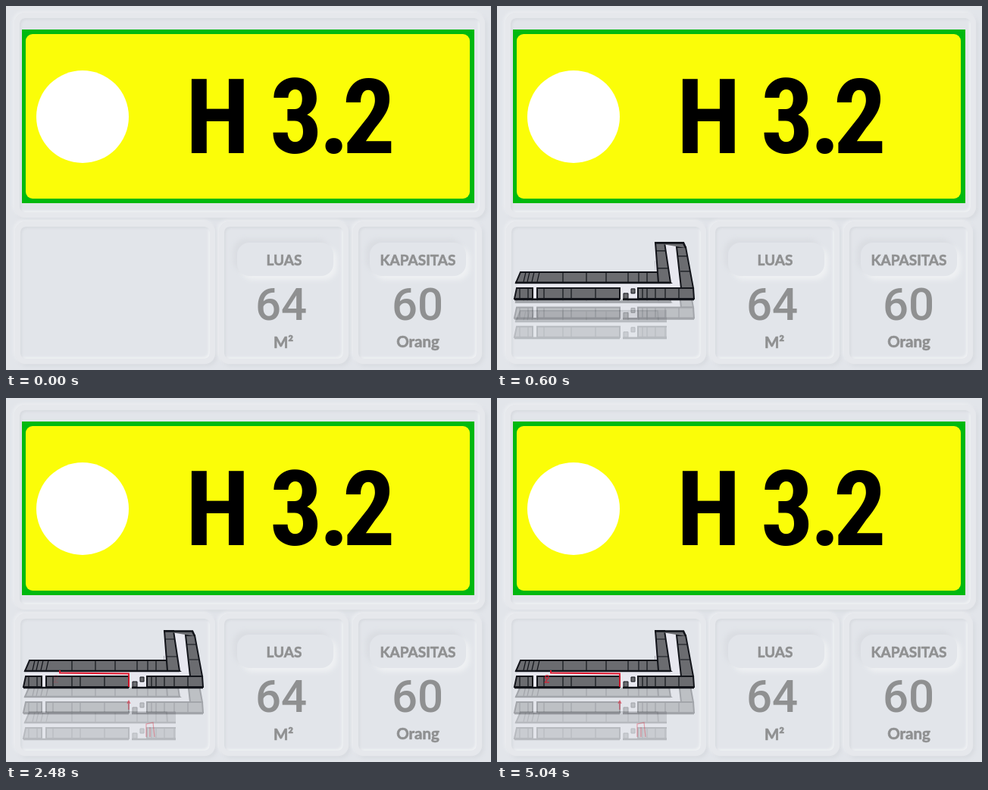
Write an HTML page that moves like this. It is 640x480 px and loops after 5120 ms.

```html
<!DOCTYPE html>
<html lang="id">
<head>
<meta charset="utf-8">
<style>
  html, body { margin: 0; width: 640px; height: 480px; overflow: hidden; background: #e2e5ea; }
  div, svg { position: absolute; box-sizing: border-box; }
  .panel {
    border-radius: 14px;
    border: 7px solid #e6e8ec;
    box-shadow: -2px -2px 4px #eceef1, 3px 3px 5px #d8dbe0, inset 2px 2px 3px #d8dbe0, inset -2px -2px 3px #eff1f3;
  }
  .pill { border-radius: 16px; box-shadow: -5px -5px 6px #dadde2, 5px 5px 6px #eff1f3; }
  .sign { left: 21px; top: 31px; width: 597px; height: 229px; background: #00b90f; }
  .sign div { inset: 6px 6px 6px 5px; border-radius: 9px; background: #fbfd08; }
  svg { left: 0; top: 0; }
  .room {
    font: 700 138px "Roboto Condensed", Roboto, sans-serif;
    font-stretch: 75%;
    font-variation-settings: "wght" 700, "wdth" 75;
  }
  .value { font: 500 60px Roboto, sans-serif; }
  .label { font: 700 19px Lato, sans-serif; stroke: #8f9091; stroke-width: .6px; }
  .unit { font-size: 20.5px; }
</style>
</head>
<body>
<div class="panel" style="left:11px;top:9px;width:621px;height:270px"></div>
<div class="panel" style="left:12px;top:284px;width:264px;height:188px"></div>
<div class="panel" style="left:281px;top:284px;width:171px;height:188px"></div>
<div class="panel" style="left:458px;top:284px;width:170px;height:188px"></div>
<div class="pill" style="left:305px;top:312px;width:127px;height:44px"></div>
<div class="pill" style="left:480px;top:312px;width:127px;height:44px"></div>
<div class="sign"><div></div></div>

<svg width="640" height="480" viewBox="0 0 640 480">
  <defs>
    <clipPath id="lowShape"><path d="M0 345H224V390H0Z"/></clipPath>
    <g id="floor" fill="#6b6c70" stroke="#12141a" stroke-width="2">
      <path d="M30 346H209L208 307H246L260 382H23Z" fill="#e8e8f0" stroke="none"/>
      <path d="M31 346H211L229 360H25Z"/>
      <path d="M209 307H221L229 360H213Z"/>
      <path d="M237 313H249L259 367H243Z"/>
      <path d="M26 367H47V381H23Z M53 367H162V381H53Z M186 367H259L260 381H186Z"/>
      <path d="M167 374h6v7h-6z M177 368h5v6h-5z" stroke-width="1"/>
      <path id="walls" fill="none" stroke-width="1.2"/>
      <path d="M23 382H162M166 382H260M208 307.5H246L249 314M24 360H229" stroke-width="2.6"/>
    </g>
  </defs>
  <circle cx="101" cy="146" r="61" fill="#fff"/>
  <text class="room" y="194" x="237 300 348 413 444">H 3.2</text>
  <g fill="#8f9091" text-anchor="middle">
    <text class="label" x="367" y="342">LUAS</text>
    <text class="label" x="543.5" y="342">KAPASITAS</text>
    <text class="value" x="363" y="414">64</text>
    <text class="value" x="543" y="414">60</text>
    <text class="label unit" x="366" y="451">M²</text>
    <text class="label unit" x="543.5" y="450">Orang</text>
  </g>
  <g id="building" fill="none" stroke="#e3142b">
    <g id="low">
      <use href="#floor" opacity=".2" clip-path="url(#lowShape)"/>
      <path id="lowRoute" d="M185 379V362L194 360L196 379M190 366V379" stroke-width="1.2"/>
    </g>
    <g id="mid">
      <use href="#floor" opacity=".3"/>
      <path id="midRoute" d="M162 377V365M160 369L162 365L164 369" stroke-width="1.2"/>
    </g>
    <g id="top">
      <use href="#floor"/>
      <path id="route" d="M162 381V363.5L71 362.5V359" pathLength="1" stroke-width="1.8" stroke-dasharray="1 2"/>
      <g id="pin" stroke-width="1.6"><circle cx="66" cy="368" r="2.3"/><path d="M67 370L63.5 375H69"/></g>
    </g>
  </g>
</svg>

<script>
  const LOOP = 5120, FLOOR_GAP = 34, DROP = 19.6;
  const $ = id => document.getElementById(id);
  const progress = (t, from, to) => Math.min(1, Math.max(0, (t - from) / (to - from)));
  const smooth = p => p * p * (3 - 2 * p);
  const lines = (xs, y, h, lean = 0) => xs.map(x => `M${x} ${y}l${lean} ${h}`).join('');

  $('walls').setAttribute('d',
    lines([38, 43, 49, 56], 346, 13, -3) + lines([87, 118, 144, 173, 187, 198], 346, 13) +
    lines([30, 41, 62, 87, 98, 130, 192, 198, 209, 222, 240], 367, 14) +
    'M210 318H223M211 341H226M239 325H251M242 345H255');

  const shift = (id, y) => $(id).setAttribute('transform', `translate(0 ${y})`);
  const fade = (id, a) => $(id).setAttribute('opacity', a);

  // The pin fades in and out alternately, with a short rest at each end.
  function pinAlpha(t) {
    if (t < 2320) return 0;
    const cycle = Math.floor((t - 2320) / 595);
    const p = smooth(progress((t - 2320) % 595, 60, 500));
    return cycle % 2 ? 1 - p : p;
  }

  function draw(t) {
    // The floors are already moving apart while they fade in.
    const spread = Math.sin(Math.PI / 2 * progress(t, -100, 1200));
    const y = DROP * (1 - spread), gap = FLOOR_GAP * spread;
    shift('top', y);
    shift('mid', y + gap);
    shift('low', y + 2 * gap);
    fade('building', progress(t, 40, 240));
    fade('lowRoute', .55 * progress(t, 760, 1040) - .2 * progress(t, 1760, 2280));
    fade('midRoute', .55 * progress(t, 1440, 1520));
    fade('route', t < 1760 ? 0 : 1);
    $('route').setAttribute('stroke-dashoffset', 1 - smooth(progress(t, 1740, 2280)));
    fade('pin', pinAlpha(t));
  }

  function tick() {
    draw(performance.now() % LOOP);
    requestAnimationFrame(tick);
  }
  tick();
</script>
</body>
</html>
```
